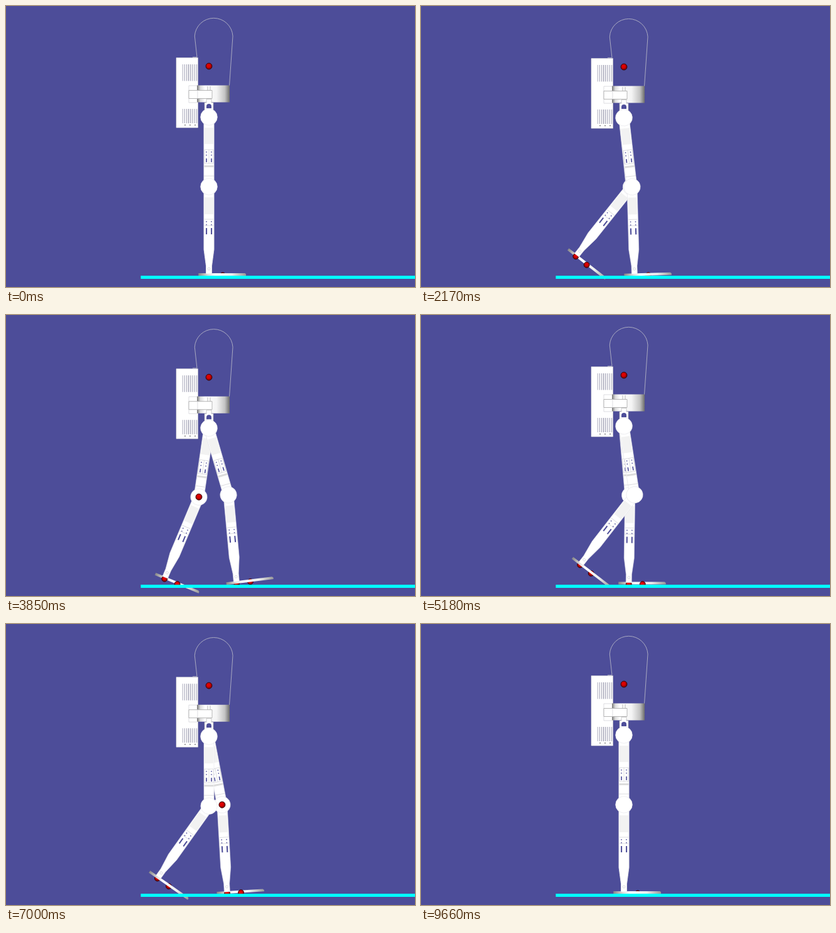
These frames come from a looping animation (651x448 px, 9900 ms). An HTML page:

```html
<!DOCTYPE html>
<html lang="en">
<head>
<meta charset="utf-8">
<title>Walking biped</title>
<style>
  html, body { margin: 0; width: 100%; height: 100%; overflow: hidden; background: #4d4d99; }
  svg { display: block; width: 651px; height: 448px; }
  .shell { fill: #fff; stroke: #e2e2e8; stroke-width: .6; }
  .shade { fill: #f2f2f2; }
  .line { fill: none; stroke: #cfcfd4; stroke-width: .7; }
  .hole { fill: #4d4d99; }
  .ball { fill: url(#red); stroke: #300; stroke-width: .8; }
</style>
</head>
<body>
<svg viewBox="0 0 651 448">
  <defs>
    <radialGradient id="red" cx=".45" cy=".42" r=".6">
      <stop offset=".35" stop-color="#e00000"/><stop offset="1" stop-color="#6a0000"/>
    </radialGradient>
    <linearGradient id="drum">
      <stop offset="0" stop-color="#777"/><stop offset=".1" stop-color="#ddd"/>
      <stop offset=".25" stop-color="#fff"/><stop offset=".6" stop-color="#f4f4f4"/>
      <stop offset=".85" stop-color="#c4c4c4"/><stop offset="1" stop-color="#6c6c6c"/>
    </linearGradient>
    <linearGradient id="sole">
      <stop offset="0" stop-color="#888"/><stop offset=".2" stop-color="#ddd"/>
      <stop offset=".35" stop-color="#fff"/><stop offset=".7" stop-color="#eee"/>
      <stop offset="1" stop-color="#999"/>
    </linearGradient>
    <pattern id="vent" x="280.5" width="3.2" height="8" patternUnits="userSpaceOnUse">
      <path d="M.6 0V8" stroke="#8f8fa6" stroke-width="1"/>
    </pattern>
    <g id="thigh">
      <path class="shell" d="M-8 0H8V111H-8Z"/>
      <path class="shade" d="M-7 17H7V43H-7Z"/>
      <path class="line" d="M-7 52H7V74H-7ZM-8 94H8M0 52V74"/>
      <path fill="#dcdcdc" d="M-7.5 77H7.5V80H-7.5Z"/>
      <path class="hole" d="M-4.7 55h1.5v1.5h-1.5zM3.2 55h1.5v1.5h-1.5zM-4.7 60h1.5v1.5h-1.5zM3.2 60h1.5v1.5h-1.5zM-4.7 66h1.6v6h-1.6zM3.2 66h1.6v6h-1.6z"/>
    </g>
    <g id="shank">
      <path class="shell" d="M-8 0H8V100L4.5 126V139H-4.5V126L-8 100Z"/>
      <path class="shade" d="M-7 17H7V44H-7Z"/>
      <path class="line" d="M-7 52H7M-7 62H7"/>
      <path class="hole" d="M-4.7 55h1.5v1.5h-1.5zM3.2 55h1.5v1.5h-1.5zM-4.7 60h1.5v1.5h-1.5zM3.2 60h1.5v1.5h-1.5zM-4.9 66h2v10h-2zM3.1 66h2v10h-2z"/>
      <circle class="line" cy="131" r="2"/>
    </g>
    <path id="plate" fill="url(#sole)" d="M-16.5 -2H57L59 -.5V2H-16.5Z"/>
    <g id="contacts"><circle class="ball" cy="1.5" r="4.5"/><circle class="ball" cx="22" cy="1.5" r="4.5"/></g>
  </defs>

  <g id="body">
    <path fill="none" stroke="#b4b4c6" stroke-width=".9" d="M297 81.5H304L300.3 48A30.4 30.4 0 0 1 361 48L355.5 127"/>
    <circle class="ball" cx="323" cy="96" r="5"/>
    <path fill="#fff" stroke="#d8d8d8" stroke-width=".6" d="M271 82.5H305.5V194H271Z"/>
    <path fill="url(#vent)" d="M280.5 93H304.5V119.5H280.5ZM280.5 164H304.5V187H280.5Z"/>
    <path fill="#888" d="M284 189h2v1.5h-2zM292 189h2v1.5h-2zM300 189h2v1.5h-2z"/>
    <path class="line" d="M304 127H291V154H304"/>
    <path fill="url(#drum)" d="M304 126.5H356V153.5H304Z"/>
    <path fill="none" stroke="#aaa" stroke-width=".8" d="M321 128V135M325 128V135"/>
    <path fill="#fff" stroke="#a4a4a4" stroke-width=".8" d="M291 134.5H328V147.5H291Z"/>
    <path class="line" d="M305 134V148"/>
    <path fill="#fff" stroke="#aaa" stroke-width=".6" d="M319 148.500H327V154H330V168H316V154H319Z"/>
    <path class="hole" d="M319 163V160A4 4 0 0 1 327 160V163Z"/>
    <g id="legs" transform="translate(323 177)"></g>
  </g>
  <path fill="#0ff" d="M214.500 430H651V435H214.500Z"/>
</svg>

<script>
const TICK = 70, LOOP = 9900, LAST = 138, STEP = 12.8, STEPS = 10;
const HELD = [9, 11, 22, 36, 68, 70, 93, 95, 98, 127];

// phase in steps since heel strike, thigh, shank and foot angles in degrees
const GAIT = [
  [0, 15.8, 5.1, -6.5], [.109, 10.9, 3.3, -3.5], [.1875, 6.7, 1.6, -1.5],
  [.3125, 5, -.8, 0], [.4375, 0, -4.3, 4], [.6, -4, -8.5, 8], [.8, -8, -14, 16],
  [.984, -8.3, -22.7, 22.5], [1.109, 0, -35.4, 35], [1.1875, 5.9, -38.5, 38],
  [1.3125, 8.8, -37.8, 37.5], [1.4375, 13, -30.9, 30], [1.6, 18, -10, 9],
  [1.7, 19, 1, -3], [1.8, 18.5, 5, -8], [1.9, 17.5, 6, -9]
];
const BOB = [[0, 3.3], [.109, 2.2], [.1875, 1.1], [.3125, 0], [.4375, -1.3],
  [.55, -1.6], [.72, -.5], [.86, 1.2], [.95, 2.8]];

const smooth = x => { x = Math.min(1, Math.max(0, x)); return x * x * (3 - 2 * x); };

// Periodic cubic through unevenly spaced keys
function sample(keys, period, phase) {
  const n = keys.length;
  phase = ((phase % period) + period) % period;
  let i = n - 1;
  while (keys[i][0] > phase) i--;
  const key = k => keys[(k + n) % n];
  const at = k => key(k)[0] + period * Math.floor(k / n);
  const width = at(i + 1) - at(i), u = (phase - at(i)) / width;
  return key(i).slice(1).map((a, c) => {
    const value = k => key(k)[c + 1];
    const slope = k => (value(k + 1) - value(k - 1)) / (at(k + 1) - at(k - 1)) * width;
    const b = value(i + 1), m = slope(i), q = slope(i + 1);
    return a + u * (m + u * (3 * (b - a) - 2 * m - q + u * (2 * (a - b) + m + q)));
  });
}

function makeLeg(far) {
  const leg = document.createElementNS("http://www.w3.org/2000/svg", "g");
  const foot = ["plate", "contacts"].map(id => `<use href="#${id}"/>`);
  if (!far) foot.reverse();
  leg.innerHTML = `<g><g>${foot.join("")}</g><use href="#shank"/></g><use href="#thigh"/>
    <circle class="shell" cy="111" r="13.2"/>${far ? '<circle class="ball" cy="111" r="5"/>' : ""}
    <circle class="shell" r="13.2"/>`;
  document.getElementById("legs").append(leg);
  const shank = leg.firstElementChild, sole = shank.firstElementChild;
  return (phase, weight) => {
    const [thigh, calf, pitch] = sample(GAIT, 2, phase).map(a => a * weight);
    leg.setAttribute("transform", `rotate(${-thigh})`);
    shank.setAttribute("transform", `translate(0 111) rotate(${thigh - calf})`);
    sole.setAttribute("transform", `translate(0 140) rotate(${pitch + calf})`);
  };
}

const poseFar = makeLeg(true), poseNear = makeLeg(false);
const body = document.getElementById("body");

function draw(now) {
  const tick = Math.min(LAST, Math.floor(now % LOOP / TICK));
  const count = tick - HELD.filter(h => h <= tick).length;
  const steps = count / STEP;
  let far = steps + 1, near = steps, weight = 1;
  if (steps < 1) {
    near += .37 * (1 - steps * steps);
    weight = smooth(count / 6);
  } else if (steps > STEPS - 1) {
    const p = steps - STEPS + 1;
    far = .37 * p;
    weight = 1 - smooth((p - .4) / .6);
  }
  poseFar(far, weight);
  poseNear(near, weight);
  body.setAttribute("transform", `translate(0 ${sample(BOB, 1, steps)[0] * weight})`);
}

const start = performance.now();
(function loop() {
  draw(performance.now() - start);
  requestAnimationFrame(loop);
})();
</script>
</body>
</html>
```
